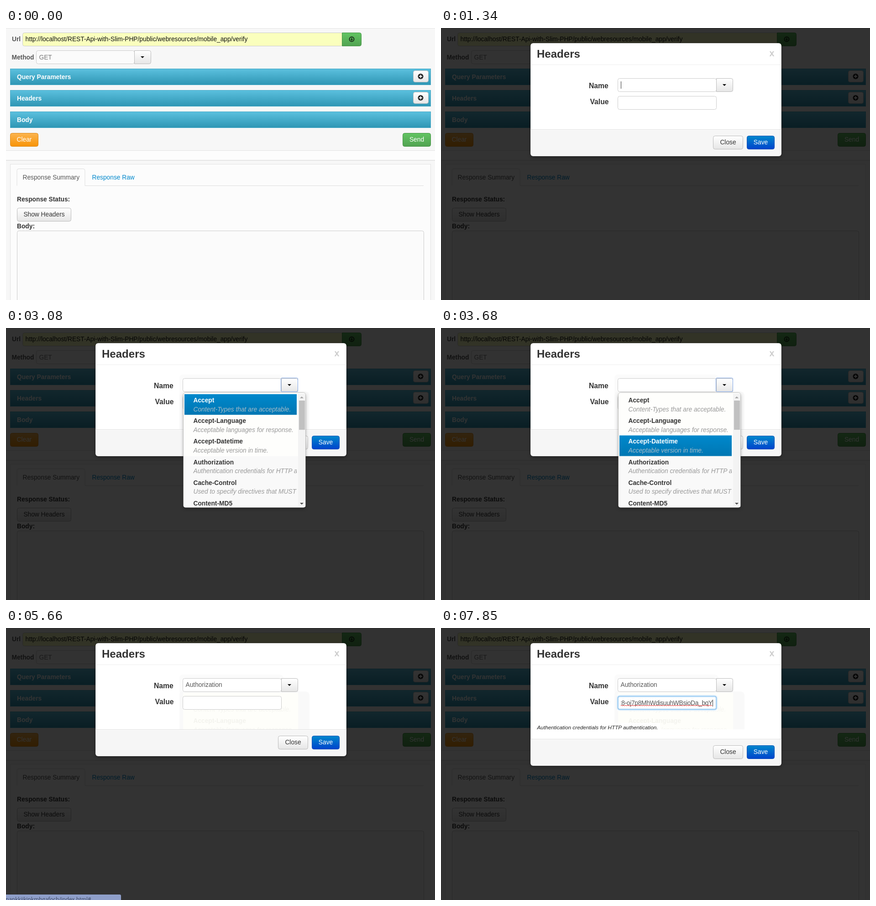
These frames come from a looping animation (940x596 px, 8000 ms). An HTML page:

```html
<!DOCTYPE html>
<html lang="en">
<head>
<meta charset="utf-8">
<title>REST client: add a header</title>
<style>
  html, body { margin: 0; width: 100%; height: 100%; overflow: hidden; background: #fdfdfd; }
  svg { display: block; width: 940px; height: 596px; }
  text { font: 13.75px "Liberation Sans", Arial, sans-serif; fill: #333; white-space: pre; }
  .b { font-weight: bold; }
  .i { font-style: italic; }
</style>
</head>
<body>
<svg id="stage" viewBox="0 0 940 596" xmlns="http://www.w3.org/2000/svg"></svg>
<script>
const LOOP = 8000;

// Drawing helpers, all returning SVG markup
const gradients = {
  white: ['#ffffff', '#e6e6e6'],
  green: ['#62c462', '#51a351'],
  orange: ['#fbb450', '#f89406'],
  teal: ['#5bc0de', '#2f96b4'],
  blue: ['#0088cc', '#0044cc'],
  pick: ['#0088cc', '#0077b3'],
  hover: ['#f2f2f2', '#e6e6e6'],
  press: ['#c8c8c8', '#dadada']
};
const defs = Object.entries(gradients).map(([id, [top, end]]) =>
  `<linearGradient id="${id}" x2="0" y2="1"><stop stop-color="${top}"/>` +
  `<stop offset="${id === 'hover' ? .5 : id === 'press' ? .25 : 1}" stop-color="${end}"/></linearGradient>`).join('');

const rect = (x, y, w, h, fill, more = '') =>
  `<rect x="${x}" y="${y}" width="${w}" height="${h}" fill="${fill}" ${more}/>`;
const box = (x, y, w, h, fill, line, r = 4, more = '') =>
  rect(x + .5, y + .5, w - 1, h - 1, fill, `stroke="${line}" rx="${r}" ${more}`);
const text = (x, y, s, fill = '#333', cls = '', size = 13.75, more = '') =>
  `<text x="${x}" y="${y}" class="${cls}" style="fill:${fill};font-size:${size}px" ${more}>${s}</text>`;
const group = (id, body, more = '') => `<g id="${id}" ${more}>${body}</g>`;
const path = (d, fill, more = '') => `<path d="${d}" fill="${fill}" ${more}/>`;
const caretDown = (x, y, fill = '#000') => path(`M${x - 4} ${y}h8l-4 4z`, fill);

const button = (x, y, w, h, kind, line, label, color) =>
  box(x, y, w, h, `url(#${kind})`, line) +
  text(x + w / 2, y + 19, label, color, '', 13.75, 'text-anchor="middle"');
const combo = (x, y) =>
  path(`M${x + .5} ${y + .5}h32q4 0 4 4v21q0 4 -4 4h-32z`, 'url(#white)', 'stroke="#bbb"');
const input = (x, y, w, h, fill = '#fff') => box(x, y, w, h, fill, '#ccc');
const glow = (id, x, y, w, h) => group(id,
  box(x, y, w, h, 'none', '#52a8ec', 4, 'stroke-width="4" opacity=".3" filter="url(#soft)"') +
  box(x, y, w, h, 'none', '#75b9f0'));
const plusIcon = (x, y) =>
  `<circle cx="${x}" cy="${y}" r="6" fill="#222"/>` +
  path(`M${x - 3.5} ${y}h7M${x} ${y - 3.5}v7`, 'none', 'stroke="#fff" stroke-width="2"');

// Page behind the dialog
const panel = (y, title, plus) =>
  box(9, y, 922, 36, 'url(#teal)', '#48a9c6', 0) + text(24, y + 23, title, '#fff', 'b') +
  (plus ? box(892, y + 4, 34, 26, 'url(#white)', '#bbb') : '');

const page =
  rect(0, 0, 940, 269, '#f7f7f7') + rect(0, 0, 940, 1, '#e6e6e6') + rect(0, 268, 940, 1, '#e3e3e3') +
  rect(0, 290, 940, 306, '#f7f7f7') + rect(0, 289, 940, 2, '#e6e6e6') +
  text(13, 29, 'Url', '#555', 'b') +
  input(36, 10, 702, 30, '#faffbd') +
  text(42.5, 29, 'http://localhost/REST-Api-with-Slim-PHP/public/webresources/mobile_app/verify', '#111') +
  path('M736.5 10.5h38q4 0 4 4v21q0 4 -4 4h-38z', 'url(#green)', 'stroke="#469446"') +
  '<circle cx="757.5" cy="24.5" r="5" fill="none" stroke="#1c331c" stroke-width="2"/>' +
  path('M756.5 21.5h2v3h2l-3 3.500l-3 -3.500h2z', '#1c331c') +
  text(12.5, 69, 'Method', '#555', 'b') +
  input(66, 49, 216, 30, '#fbfbfb') + text(72.500, 69, 'GET', '#777') +
  combo(281, 49) + caretDown(299, 62) +
  panel(89, 'Query Parameters', true) + panel(136, 'Headers', true) + panel(183, 'Body') +
  group('plusHover', box(892, 140, 34, 26, 'url(#hover)', '#bbb')) +
  group('plusPress', box(892, 140, 34, 26, 'url(#press)', '#b0b0b0')) +
  plusIcon(908.5, 106) + plusIcon(908.5, 153) +
  button(9, 230, 62, 30, 'orange', '#dc8a1c', 'Clear', '#fff') +
  button(869, 230, 62, 30, 'green', '#469446', 'Send', '#fff') +
  box(9, 298, 922, 310, '#fcfcfc', '#e3e3e3', 0) +
  path('M24 345.500V312.500q0 -4 4 -4h141q4 0 4 4V345.500H915', 'none', 'stroke="#ddd"') +
  text(36.5, 332, 'Response Summary', '#555') + text(188.5, 332, 'Response Raw', '#0088cc') +
  text(24, 380, 'Response Status:', '#333', 'b') +
  button(24, 394, 119, 30, 'white', '#bbb', 'Show Headers', '#333') +
  text(24, 439, 'Body:', '#333', 'b') +
  box(24, 444, 892, 170, '#fbfbfb', '#ccc');

// Suggestion list
const PITCH = 45.2;
const options = [
  ['Accept', 'Content-Types that are acceptable.'],
  ['Accept-Language', 'Acceptable languages for response.'],
  ['Accept-Datetime', 'Acceptable version in time.'],
  ['Authorization', 'Authentication credentials for HTTP authentication.'],
  ['Cache-Control', 'Used to specify directives that MUST be obeyed.'],
  ['Content-MD5', '']
];
const option = (n, title = '#333', note = '#999') =>
  text(410.5, 163 + PITCH * n, options[n][0], title, 'b') +
  text(410.5, 182.500 + PITCH * n, options[n][1], note, 'i');
const picked = n => group('pick' + n,
  rect(391, 145 + PITCH * n, 246, 45.2, 'url(#pick)') + option(n, '#fff', '#a9bcc8'));

const list =
  box(388, 141, 269, 253, '#fefefc', 'rgba(0,0,0,.2)', 5, 'filter="url(#shade)"') +
  path('M389 281H656V389q0 4 -4 4H393q-4 0 -4 -4z', '#f9f9f9') +
  `<g clip-path="url(#listClip)">${options.map((_, n) => option(n)).join('')}` +
  `${[0, 1, 2, 3].map(picked).join('')}</g>` +
  rect(640, 144, 16, 248, '#f3f3f3') + rect(642, 159, 13, 64, '#c1c1c1') +
  path('M644 154h8l-4 -4z', '#a3a3a3') + caretDown(648, 383, '#505050');

// Pale trace the list and the focus ring leave on the dialog
const ghost =
  rect(380, 102, 228, 45, '#fbfbfb', 'rx="8"') +
  group('trace',
    path('M380 222V147q0 -8 8 -8H655q10 0 10 10V222z', '#f9f9f9') +
    rect(388, 142, 252, 80, '#fefefa') +
    `<g clip-path="url(#traceClip)">${option(0, '#f3f3ee', '#f5f5f0')}${option(1, '#f3f3ee', '#f5f5f0')}</g>`);

const footer =
  path('M196.500 222H745.500V275q0 5.500 -6 5.500H202.500q-6 0 -6 -5.500z', '#f6f6f6') +
  rect(196.5, 222, 549, 1, '#ddd') + rect(196.5, 223, 549, 1, '#fff') +
  button(596, 236, 66, 30, 'white', '#bbb', 'Close', '#333') +
  button(670, 236, 61, 30, 'blue', '#0a4fb8', 'Save', '#fff');

const squiggle = 'M394 171' + 'l2 -2l2 2'.repeat(50);
const token = `<g clip-path="url(#valueClip)">` +
  text(595, 169, '28-oj7p8MhWdisuuhWBsioDa_bqY', '#555', '', 13.75, 'text-anchor="end" letter-spacing="-.3"') +
  path(squiggle, 'none', 'stroke="#f03030"') + '</g>' + rect(595, 157, 1, 15, '#333');

const dialog =
  rect(196, 33, 550, 248, '#fff', 'id="sheet" rx="6" stroke="rgba(0,0,0,.3)" filter="url(#shade)"') +
  text(210, 65, 'Headers', '#333', 'b', 24.06) +
  text(719.5, 62, 'x', '#ccc', 'b', 19.6) + rect(196.5, 80, 549, 1, '#eee') +
  group('ghost', ghost) +
  group('wipe', rect(386, 146, 220, 36, '#fefefe')) +
  text(324, 132, 'Name', '#333', 'b', 15.71) + text(326.5, 167, 'Value', '#333', 'b', 15.71) +
  input(387, 110, 217, 30) + input(387, 149, 217, 30) +
  glow('nameFocus', 387, 110, 217, 30) + glow('valueFocus', 387, 149, 217, 30) +
  combo(603, 110) +
  group('comboHover', path('M603.500 110.500h32q4 0 4 4v21q0 4 -4 4h-32z', 'url(#hover)', 'stroke="#b3b3b3"')) +
  group('comboFocus', box(602, 109, 38, 31, 'none', '#7ea6e8', 2)) +
  caretDown(621, 123) +
  group('nameCaret', rect(394, 117, 1, 16, '#333')) +
  group('nameText', text(393.5, 129, 'Authorization', '#555')) +
  group('valueCaret', rect(394, 157, 1, 15, '#333')) +
  group('token', token) +
  group('help', rect(205, 208, 275, 15, '#fff') +
    text(210.5, 222, options[3][1], '#222', 'i', 11.78)) +
  group('footer', footer) +
  group('list', list);

const status =
  path('M0 584H249q3 0 3 3V596H0z', '#8f9fca') +
  text(-1, 599, 'pankkijkipkmhgafoch/index.html#', '#3c4763', '', 11.8,
    'font-family="Open Sans"').replace('font-size', 'font-family:\'Open Sans\',sans-serif;font-size');

document.getElementById('stage').innerHTML = `<defs>${defs}
  <filter id="soft" x="-10%" y="-40%" width="120%" height="180%"><feGaussianBlur stdDeviation="1.2"/></filter>
  <filter id="shade" x="-5%" y="-10%" width="110%" height="120%"><feDropShadow dx="0" dy="3" stdDeviation="3" flood-opacity=".3"/></filter>
  <clipPath id="listClip"><rect x="389" y="143" width="248" height="249"/></clipPath>
  <clipPath id="traceClip"><rect x="388" y="142" width="252" height="80"/></clipPath>
  <clipPath id="valueClip"><rect x="394" y="150" width="202" height="28"/></clipPath>
  </defs>` +
  rect(0, 0, 940, 596, '#fdfdfd') + page +
  group('shadeOut', rect(0, 0, 940, 596, '#000', 'opacity=".8"')) +
  group('status', status) + group('dialog', dialog);

// Each track holds a value from its time until the next one
function track(id, prop, steps) {
  const frames = steps.map(([t, v]) => ({ offset: t / LOOP, [prop]: v, easing: 'step-end' }));
  frames.push({ offset: 1, [prop]: steps[steps.length - 1][1] });
  document.getElementById(id).animate(frames, { duration: LOOP, iterations: Infinity });
}
const fades = {
  plusHover: [[500, .33], [530, .67], [560, 1], [1340, 0]],
  plusPress: [[1160, 1], [1340, 0]],
  shadeOut: [[1340, 1]],
  dialog: [[1340, 1]],
  nameFocus: [[1370, .5], [1400, 1], [2480, .8], [2510, .6], [2540, .4], [2570, .2], [2630, 0]],
  nameCaret: [[1340, 1], [1580, 0], [1880, 1], [2180, 0]],
  comboHover: [[2180, .33], [2210, .67], [2270, 1], [3020, .5], [3080, 0]],
  comboFocus: [[2480, 1], [5600, 0]],
  ghost: [[2480, 1]],
  trace: [[2570, 1]],
  list: [[2570, 1], [5630, 0]],
  pick0: [[3020, 1], [3410, 0]],
  pick1: [[3410, 1], [3680, 0]],
  pick2: [[3680, 1], [4010, 0]],
  pick3: [[4010, 1]],
  status: [[4100, .5], [4160, 1], [5840, .5], [5900, 0]],
  nameText: [[5630, 1]],
  help: [[5780, 1]],
  wipe: [[7220, 1]],
  valueFocus: [[7220, .5], [7250, 1]],
  valueCaret: [[7220, 1], [7400, 0], [7730, 1], [7850, 0]],
  token: [[7850, 1]]
};
for (const [id, steps] of Object.entries(fades)) track(id, 'opacity', [[0, 0], ...steps]);
track('footer', 'transform', [[0, 'translateY(0px)'], [5780, 'translateY(21px)']]);
track('sheet', 'height', [[0, '248px'], [5780, '269px']]);
</script>
</body>
</html>
```
